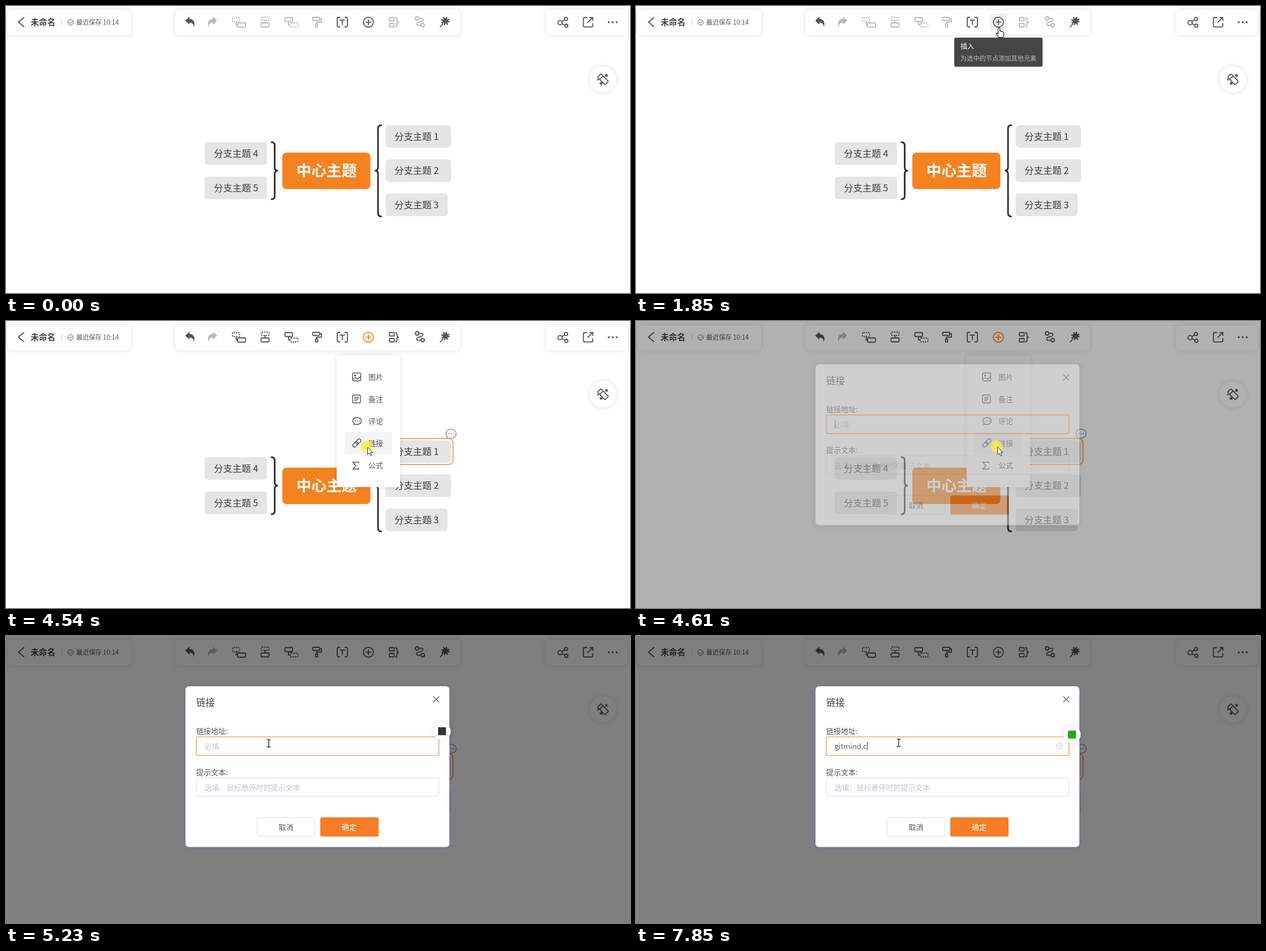
These frames come from a looping animation (1102x508 px, 8 s). An HTML page:

```html
<!DOCTYPE html>
<html lang="zh-CN">
<head>
<meta charset="utf-8">
<title>思维导图</title>
<style>
  html, body { margin: 0; width: 100%; height: 100%; overflow: hidden; background: #fff; }
  svg { display: block; width: 1102px; height: 508px; font-family: "Noto Sans CJK SC", "Noto Sans CJK", "Noto Sans", sans-serif; }
  text { white-space: pre; }
  .card { fill: #fff; filter: drop-shadow(0 0 4px rgba(0,0,0,.13)); }
  .icon { color: #555; fill: none; stroke: currentColor; stroke-width: 1.8; }
  .icon .solid { fill: currentColor; stroke: none; }
  .dashed { stroke-dasharray: 2.4 1.6; }
  .off { color: #b9b9b9; }
  .brace { fill: none; stroke: #333; stroke-width: 3; stroke-linecap: round; }
  .topic rect { fill: #e5e5e5; }
  .topic text { font-size: 16.4px; fill: #3c3c3c; }
  .small { font-size: 13px; fill: #555; }
  .hint { font-size: 13px; fill: #c0c4cc; }
  .middle { text-anchor: middle; }
  .hover { fill: #f4f4f4; }
  .click { fill: #f8f032; opacity: .75; }

  .needs-topic, #tooltip, #shade, #dialog, #cursor { animation: 8s linear infinite; }
  .needs-topic { animation-name: enable; animation-timing-function: step-end; }
  #tooltip { animation-name: tooltip; }
  #shade { animation-name: shade; }
  #dialog { animation-name: dialog; }
  #cursor { animation-name: cursor; }

  @keyframes enable { 0% { color: #b9b9b9; } 28.6%, 100% { color: #555; } }
  @keyframes tooltip {
    0%, 18.1% { opacity: 0; }
    21.25%, 23.75% { opacity: 1; }
    25.6%, 39.1% { opacity: 0; }
    40.5% { opacity: .8; }
    41.25%, 42.25% { opacity: 1; }
    43.1%, 100% { opacity: 0; }
  }
  @keyframes shade {
    0% { opacity: 0; }
    56.75% { opacity: 0; animation-timing-function: ease; }
    59.25%, 100% { opacity: .5; }
  }
  @keyframes dialog {
    0% { opacity: 0; transform: translateY(-20px); }
    56.75% { opacity: 0; transform: translateY(-20px); animation-timing-function: ease; }
    60.4%, 100% { opacity: 1; transform: none; }
  }
  @keyframes cursor {
    0%, .875% { transform: translate(1023px, 479px); animation-timing-function: ease-out; }
    3.375% { transform: translate(667px, 185px); }
    4.25%, 7.5% { transform: translate(682px, 185px); }
    9.25% { transform: translate(699px, 188px); }
    12% { transform: translate(699px, 188px); animation-timing-function: ease-in-out; }
    18.75% { transform: translate(641px, 38px); }
    23.125% { transform: translate(641px, 38px); animation-timing-function: ease-in-out; }
    28.375% { transform: translate(716px, 224px); }
    29.25% { transform: translate(716px, 224px); animation-timing-function: ease-in; }
    32.6% { transform: translate(690px, 174px); animation-timing-function: ease-out; }
    38.75% { transform: translate(645px, 38px); }
    40.5% { transform: translate(647px, 38px); }
    48.1% { transform: translate(647px, 38px); animation-timing-function: ease-in-out; }
    54.4% { transform: translate(638px, 223px); }
    58.6% { transform: translate(638px, 223px); animation-timing-function: ease-in-out; }
    64.75%, 71.1% { transform: translate(464px, 190px); }
    71.2%, 100% { transform: translate(464px, 189px); }
  }
</style>
</head>
<body>
<svg viewBox="0 0 1102 508">
  <!-- Mind map -->
  <g class="topic">
    <rect x="670.5" y="211" width="115.5" height="40" rx="7"/><text x="686" y="237">分支主题 1</text>
    <rect x="670.5" y="271.5" width="115.5" height="40" rx="5"/><text x="686" y="297">分支主题 2</text>
    <rect x="670.5" y="332" width="109.5" height="40" rx="5"/><text x="686" y="358">分支主题 3</text>
    <rect x="351" y="241" width="110" height="40" rx="5"/><text x="367" y="267">分支主题 4</text>
    <rect x="351" y="302" width="110" height="40" rx="5"/><text x="367" y="327.5">分支主题 5</text>
  </g>
  <path class="brace" d="M662.5 211Q657 211 657 217V285Q657 291.5 651.500 291.500Q657 291.500 657 298V366Q657 372.500 662.500 372.500"/>
  <path class="brace" d="M469 241Q474.500 241 474.500 247V286Q474.500 291.500 480 291.500Q474.500 291.500 474.500 297V336Q474.500 342 469 342"/>
  <rect x="488" y="259.500" width="155.500" height="64.500" rx="7" fill="#f58220"/>
  <text class="middle" x="566" y="301.300" font-size="26.700" font-weight="700" fill="#fff">中心主题</text>
  <g data-on="2290-8000" fill="none">
    <rect x="667.200" y="208" width="122.300" height="46" rx="8" stroke="#f9a25c" stroke-width="2"/>
    <path d="M786 191.500c12 0 12 16 0 16h-8l1.500-3c-5-5-2-13 6.500-13z" fill="#fff" stroke="#999" stroke-width="1.600"/>
    <path d="M780.500 199.500h2m2.500 0h2m2.500 0h2" stroke="#888" stroke-width="2"/>
  </g>

  <!-- Top bars -->
  <rect class="card" x="3" y="7" width="218" height="44.500" rx="6"/>
  <rect class="card" x="299" y="7" width="503" height="44.500" rx="6"/>
  <rect class="card" x="954" y="7" width="144" height="44.500" rx="6"/>
  <path class="icon" d="M32 20L22 28.500L32 37"/>
  <text x="43.500" y="34" font-size="14.600" font-weight="700" fill="#444">未命名</text>
  <path d="M98.500 23V35" stroke="#ccc"/>
  <g class="icon" style="stroke-width:1"><circle cx="114" cy="29" r="4.800"/><path d="M111.500 29L113.500 31L117 27.300"/></g>
  <text x="124" y="33.200" font-size="11.200" fill="#555">最近保存 10:14</text>

  <g class="icon"><path id="undo" class="solid" d="M316.500 25.800L324 19V23C331 23 335 29 331.500 37.500C331.500 32 329 29.500 324 29.500V33Z"/></g>
  <g class="icon off"><path class="solid" transform="matrix(-1 0 0 1 689.500 0)" d="M316.500 25.800L324 19V23C331 23 335 29 331.500 37.500C331.500 32 329 29.500 324 29.500V33Z"/></g>
  <g class="icon needs-topic">
    <rect class="dashed" x="400" y="20.500" width="12.500" height="7" rx="1.500"/><path d="M406.500 28V33.500H409"/><rect x="409" y="30" width="14" height="7.500" rx="1.500"/>
    <rect class="dashed" x="450.500" y="19.500" width="14" height="6" rx="1.500"/><path d="M457.500 25.500V30"/><rect x="450.500" y="30" width="14" height="7" rx="1.500"/>
    <rect x="492.500" y="20.500" width="13.500" height="7" rx="1.500"/><path d="M499 27.500V33.500H502"/><rect class="dashed" x="502" y="30" width="13.500" height="7" rx="1.500"/>
    <rect x="541.500" y="20" width="12.500" height="5.500" rx="1.500"/><path d="M554 22.500H557V28.500H548.500V32"/><rect x="546.700" y="32" width="3.600" height="5"/>
    <rect x="677" y="20.500" width="8.500" height="6" rx="1"/><rect x="677" y="31" width="8.500" height="6" rx="1"/>
    <path d="M687.500 20.500Q690.500 20.500 690.500 23.500V26Q690.500 28.700 694 28.700Q690.500 28.700 690.500 31.500V34Q690.500 37 687.500 37"/>
    <circle cx="726" cy="22" r="3"/><path d="M729 22C739 20 738 27 731 28C722 29 724 36 733 34"/><circle cx="736" cy="34" r="3"/>
  </g>
  <g class="icon">
    <path d="M590 20H587.500Q585 20 585 22.500V34.500Q585 37 587.500 37H590M598 20H600.500Q603 20 603 22.500V34.500Q603 37 600.500 37H598M589.500 24.800H598.500M594 24.800V33.500"/>
    <circle cx="776" cy="26.500" r="5" class="solid"/><circle cx="776" cy="26.500" r="6" stroke-width="3" stroke-dasharray="2.300 2.412"/><path d="M772 31L766.500 37.500"/>
  </g>
  <rect data-on="1400-1990 2950-3530" x="625" y="13.500" width="31" height="31" rx="4" fill="#f1f1f1"/>
  <g class="icon" id="plus"><circle cx="640" cy="28.700" r="8.800"/><path d="M635 28.700H645M640 23.700V33.700"/></g>

  <g class="icon">
    <circle cx="978.500" cy="29.500" r="3.800"/><circle cx="989" cy="23" r="2.800"/><circle cx="989.500" cy="35" r="2.800"/><path d="M981.700 27.500L986.600 24.500M982 31.500L987 33.700"/>
    <path d="M1026.500 20.500H1022.500Q1019.700 20.500 1019.700 23V34.500Q1019.700 37.200 1022.500 37.200H1033.500Q1036.300 37.200 1036.300 34.500V30.500M1027 29.500L1036 20.700M1030.500 20.500H1036.300V26.300"/>
    <g class="solid"><circle cx="1064.500" cy="28.700" r="1.700"/><circle cx="1071.500" cy="28.700" r="1.700"/><circle cx="1078.500" cy="28.700" r="1.700"/></g>
  </g>
  <circle class="card" cx="1054" cy="130" r="23.500"/>
  <g class="icon">
    <g transform="rotate(45 1054.500 129.500)"><rect x="1045" y="125.500" width="19" height="8.500" rx="1.500"/><path d="M1050.500 125.500V134"/></g>
    <path id="star" class="solid" d="M1060.500 119.200l1.200 2.200 2.300.3-1.700 1.700.5 2.400-2.300-1.100-2.300 1.100.5-2.400-1.700-1.700 2.300-.3z"/>
    <use href="#star" x="-9.500" y="14"/><circle class="solid" cx="1045.500" cy="130.500" r="1.400"/>
  </g>

  <!-- Tooltip and insert menu -->
  <g id="tooltip" font-weight="500">
    <rect x="562" y="56" width="156" height="51.500" rx="3" fill="#464646"/>
    <text x="573" y="75.500" font-size="12" fill="#fff">插入</text>
    <text x="573" y="96.500" font-size="11.200" fill="#b8b8b8">为选中的节点添加其他元素</text>
  </g>
  <g data-on="3530-4610">
    <rect class="card" x="584" y="61" width="112" height="233" rx="4"/>
    <rect class="hover" data-on="4010-4075" x="598" y="79.500" width="84" height="39" rx="3"/>
    <rect class="hover" data-on="4075-4130" x="598" y="118.500" width="84" height="39" rx="3"/>
    <rect class="hover" data-on="4130-4200" x="598" y="157.500" width="84" height="39" rx="3"/>
    <rect class="hover" data-on="4200-4610" x="598" y="196.500" width="84" height="39" rx="3"/>
    <g class="icon" style="stroke-width:1.400">
      <rect x="612" y="92" width="14.500" height="14" rx="2.500"/><path d="M612 103L617 100L621 103L626.500 98"/><circle cx="616.500" cy="96.500" r="1"/>
      <rect x="612" y="131" width="14" height="14" rx="2.500"/><path d="M615 135H623M615 138H623M615 141H620"/>
      <path d="M620 171c10 0 10 12 0 12h-6l1-2.300c-5-4-2-9.700 5-9.700z"/><path d="M616 177h1.600m2 0h1.600m2 0h1.600"/>
      <g transform="rotate(-45 619.500 216)"><rect x="610.500" y="213" width="10.500" height="6" rx="3"/><rect x="618" y="213" width="10.500" height="6" rx="3"/></g>
      <path d="M623 251.500V250H612.500L618 256L612.500 262H623V260.500"/>
    </g>
    <g class="small">
      <text x="640" y="104">图片</text><text x="640" y="143">备注</text><text x="640" y="182">评论</text>
      <text x="640" y="221">链接</text><text x="640" y="260">公式</text>
    </g>
  </g>

  <!-- Link dialog -->
  <rect id="shade" width="1102" height="508"/>
  <g id="dialog">
    <rect x="317" y="89" width="466" height="284.500" rx="6" fill="#fff" style="filter:drop-shadow(0 1px 5px rgba(95,110,150,.55))"/>
    <text x="336" y="124.300" font-size="16.500" fill="#444">链接</text>
    <path d="M754.500 106.800L765 117.300M765 106.800L754.500 117.300" stroke="#666" stroke-width="1.300"/>
    <text class="small" x="336" y="173">链接地址:</text>
    <rect x="336" y="178.500" width="428.500" height="33" rx="3" fill="#fff" stroke="#f58a3c" stroke-width="1.200"/>
    <text class="hint" data-on="0-6090" x="350.500" y="200">必填</text>
    <text id="typed" class="small" x="350.500" y="200" style="fill:#5f5d6c"></text>
    <path id="caret" data-on="4540-5150 5690-8000" d="M0.500 187.500V202" stroke="#444"/>
    <g data-on="7250-8000" fill="none" stroke="#bbbec6"><circle cx="748" cy="194.500" r="5.300"/><path d="M746 192.500L750 196.500M750 192.500L746 196.500"/></g>
    <text class="small" x="336" y="245.500">提示文本:</text>
    <rect x="336" y="251" width="428.500" height="32.500" rx="3" fill="none" stroke="#dcdfe6"/>
    <text class="hint" x="350.500" y="272.700">选填：鼠标悬停时的提示文本</text>
    <rect x="443.500" y="321.500" width="102" height="33" rx="3" fill="none" stroke="#dcdfe6"/>
    <text class="small middle" x="494.500" y="343">取消</text>
    <rect x="555" y="321" width="103" height="34" rx="3" fill="#f77d26"/>
    <text class="small middle" x="606" y="343" style="fill:#fff">确定</text>
  </g>
  <g data-on="4880-5690"><circle class="card" cx="770" cy="168.500" r="15.300"/><rect x="763" y="161.500" width="14" height="14" fill="#333"/></g>
  <g data-on="5690-8000"><circle class="card" cx="770" cy="174.500" r="15.300"/><rect x="763" y="167.500" width="14" height="14" fill="#27a327"/></g>

  <!-- Input method candidates -->
  <g data-on="6160-6570"><rect class="card" x="363" y="209" width="238" height="39" rx="3"/><text x="375" y="233.500" font-size="14" fill="#444">1 git   2 给他   3 个体   4 歌厅</text></g>
  <g data-on="6570-7370"><rect class="card" x="363" y="209" width="335" height="39" rx="3"/><text x="375" y="233.500" font-size="14" fill="#444">1 gitmind   2 给他   3 个体   4 歌厅   5 个</text></g>

  <g id="cursor">
    <circle class="click" data-on="2240-2400 3400-3530 4470-4610" cx="-1" cy="-1" r="10.500"/>
    <path data-on="70-1400 1990-2950 4000-5100" d="M0.500 0V13.500L3.600 10.700L5.800 15.700L8 14.700L5.900 9.800H10Z" fill="#fff" stroke="#333"/>
    <path data-on="1400-1990 2950-4000" d="M-1.500 11V1.300Q0 -1 1.600 1.300V6.500Q3.500 5.500 4.400 7.200Q6 6.400 6.800 8Q8.500 7.400 8.700 9.500V13Q8.700 15 7.200 17.500H-0.500Q-2 14.500 -4.800 11.500Q-5 8.500 -1.500 11Z" fill="#fff" stroke="#222" stroke-width="1.100"/>
    <path data-on="5100-8000" d="M-3.500 -6.500H-1Q0 -6.500 0 -5.500Q0 -6.500 1 -6.500H3.500M0 -5.500V5.500M-3.500 6.500H-1Q0 6.500 0 5.500Q0 6.500 1 6.500H3.500" fill="none" stroke="#333" stroke-width="1.400"/>
  </g>
</svg>
<script>
  const LOOP = 8000;
  const ADDRESS = 'gitmind.cn';
  const KEY_TIMES = [6090, 6160, 6300, 6570, 6700, 6770, 6900, 7520, 7650, 7850];
  const typed = document.getElementById('typed');
  const caret = document.getElementById('caret');
  const plus = document.getElementById('plus');
  const timed = [...document.querySelectorAll('[data-on]')].map(el => ({
    el, spans: el.dataset.on.split(' ').map(span => span.split('-').map(Number))
  }));
  const during = (t, [from, to]) => t >= from && t < to;

  // Share the clock of the CSS animations so both stay in step.
  const clock = document.getAnimations()[0];

  function draw() {
    const t = (clock.currentTime || 0) % LOOP;
    for (const { el, spans } of timed) {
      el.style.display = spans.some(span => during(t, span)) ? '' : 'none';
    }
    plus.style.color = during(t, [3530, 4610]) ? '#f58220' : '';
    const count = KEY_TIMES.filter(time => time <= t).length;
    typed.textContent = ADDRESS.slice(0, count);
    const width = count ? typed.getComputedTextLength() : 0;
    caret.setAttribute('transform', `translate(${Math.round(350.5 + width)})`);
    requestAnimationFrame(draw);
  }
  draw();
</script>
</body>
</html>
```
